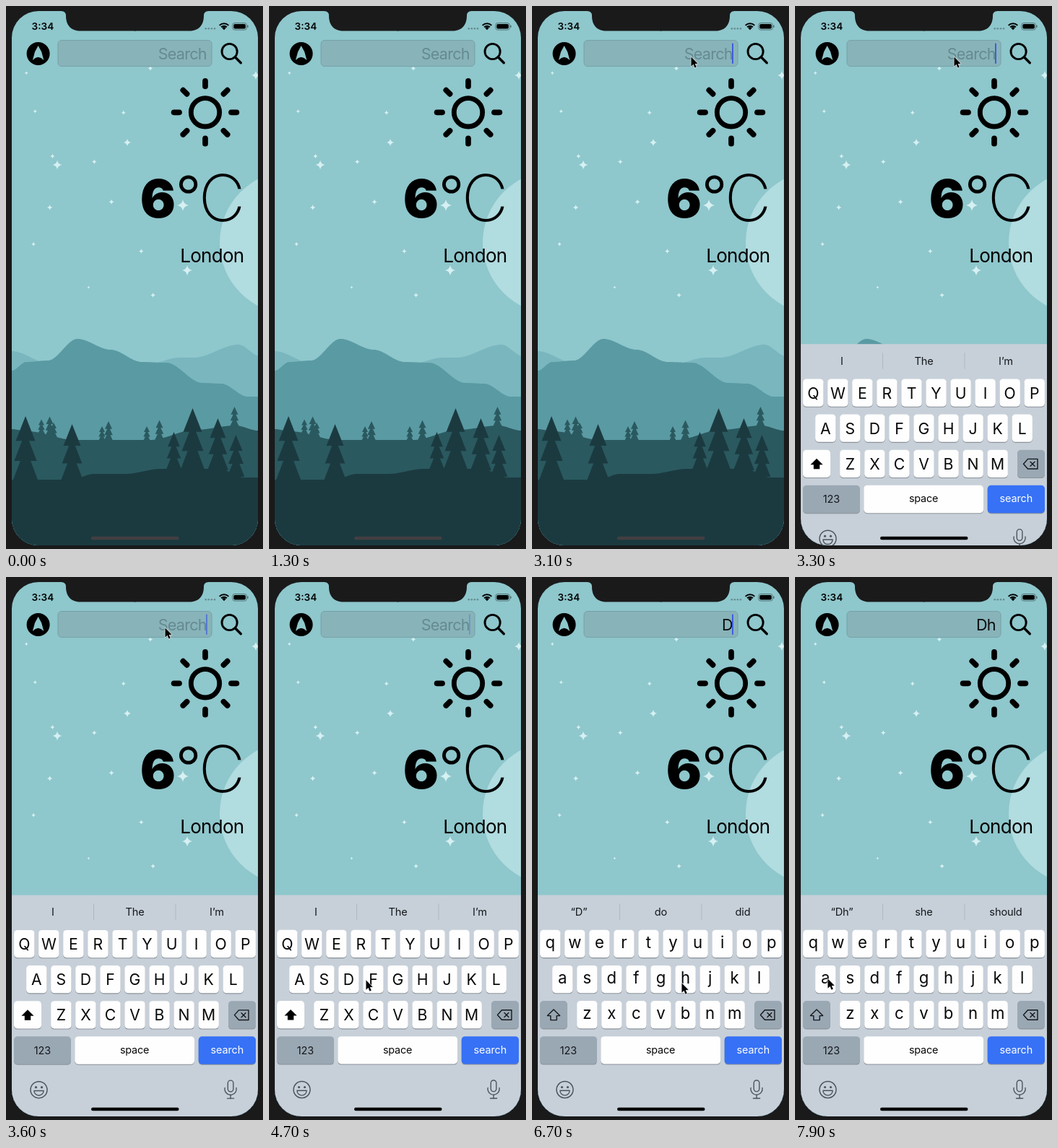
Animation, 356 px wide and 752 px high, one loop 8000 ms. Source, as an HTML page with a canvas:

```html
<!DOCTYPE html>
<html lang="en">
<head>
<meta charset="utf-8">
<title>Weather search</title>
<style>
html, body { margin: 0; width: 100%; height: 100%; overflow: hidden; background: #1a1a1b; }
canvas { display: block; width: 356px; height: 752px; }
</style>
</head>
<body>
<canvas id="stage"></canvas>
<script>
const W = 356, H = 752, LOOP = 8000, MID = 178.5;
const LEFT = 8, RIGHT = 349, TOP = 7;
const SKY = '#8ec7cc', BEZEL = '#1a1a1b', INK = '#15181b', GREY = '#9aa8b4';
const TAP = 3000, KEYS_UP = 3100, TYPE_D = 5400, TYPE_H = 7000;
const canvas = document.getElementById('stage');
const dpr = window.devicePixelRatio || 1;
canvas.width = W * dpr;
canvas.height = H * dpr;
const c = canvas.getContext('2d');

const clamp = v => Math.max(0, Math.min(1, v));
const smooth = p => p * p * (3 - 2 * p);
const mix = (a, b, p) => a + (b - a) * p;

function paint(fill) {
  c.fillStyle = fill;
  c.fill();
}

function stroke(width, color) {
  c.lineWidth = width;
  c.strokeStyle = color;
  c.stroke();
}

function text(str, x, y, size, { weight = 400, align = 'center', color = '#000', track = 0 } = {}) {
  c.font = `${weight} ${size}px Inter, "Open Sans", sans-serif`;
  c.letterSpacing = track + 'px';
  c.textAlign = align;
  c.fillStyle = color;
  c.fillText(str, x, y);
}

function round(x, y, w, h, r) {
  c.beginPath();
  c.roundRect(x, y, w, h, r);
}

function box(x, y, w, h, r, fill) {
  round(x, y, w, h, r);
  paint(fill);
}

function circle(x, y, r) {
  c.beginPath();
  c.arc(x, y, r, 0, Math.PI * 2);
}

function disc(x, y, r, fill) {
  circle(x, y, r);
  paint(fill);
}

function ring(x, y, r, width, color) {
  circle(x, y, r);
  stroke(width, color);
}

function line(x1, y1, x2, y2, width, color, cap = 'round') {
  c.beginPath();
  c.moveTo(x1, y1);
  c.lineTo(x2, y2);
  c.lineCap = cap;
  stroke(width, color);
}

// Polygon around (x, y); mirrored shapes list only their right half
function poly(x, y, pts, mirrored = false) {
  const all = mirrored ? [...pts, ...pts.map(([px, py]) => [-px, py]).reverse()] : pts;
  c.beginPath();
  all.forEach(([px, py]) => c.lineTo(x + px, y + py));
  c.closePath();
}

// Smooth height profile through a few points
const ridge = pts => x => {
  const i = pts.findIndex(p => p[0] > x);
  if (i < 0) return pts[pts.length - 1][1];
  if (i === 0) return pts[0][1];
  const [x0, y0] = pts[i - 1], [x1, y1] = pts[i];
  return mix(y0, y1, smooth((x - x0) / (x1 - x0)));
};

const LAYERS = [
  { color: '#79b6be', top: ridge([[8, 478], [60, 495], [200, 495], [240, 487], [260, 487], [322, 469], [352, 485]]) },
  { color: '#5a9aa3', top: ridge([[8, 505], [28, 493], [58, 491], [99, 461], [145, 476], [188, 493],
    [222, 494], [272, 522], [298, 523], [335, 541]]) },
  { color: '#2a595f', top: ridge([[8, 586], [30, 589], [95, 601], [200, 601], [262, 587], [318, 581], [349, 588]]),
    trees: [49, 60.5, 66, 142, 133, 212.5, 195, 316.5].map((x, i) => [x, i % 2 ? 26 : 19]) },
  { color: '#1b3a40', top: ridge([[90, 656], [122, 648], [165, 648], [215, 641], [295, 641], [330, 653]]),
    trees: [[27, 88], [91.5, 77], [232.5, 51], [258.5, 84], [293.5, 70], [318.5, 56]] }
];

function tree(x, base, h, fill) {
  const half = h * 0.18 + 1.5;
  for (let i = 0; i < 3; i++) {
    const apex = base - h * (1 - i * 0.24), foot = base - h * (2 - i) * 0.31;
    const w = half * (0.76 + i * 0.12);
    poly(x, 0, [[0, apex], [w, foot], [-w, foot]]);
    paint(fill);
  }
}

function layer({ color, top, trees = [] }) {
  c.beginPath();
  c.moveTo(LEFT, H);
  for (let x = LEFT; x <= RIGHT; x++) c.lineTo(x, top(x));
  c.lineTo(RIGHT, H);
  paint(color);
  trees.forEach(([x, h]) => tree(x, top(x) + 2, h + 2, color));
}

function star(x, y, r) {
  c.beginPath();
  c.moveTo(x + r, y);
  for (let i = 1; i <= 4; i++) {
    const a = i * Math.PI / 2, b = a - Math.PI / 4, k = r * 0.2;
    c.quadraticCurveTo(x + k * Math.cos(b), y + k * Math.sin(b), x + r * Math.cos(a), y + r * Math.sin(a));
  }
  paint('#d6f0f2');
}

function random(seed) {
  return () => (seed = seed * 16807 % 2147483647) / 2147483647;
}

function stars() {
  [[245, 276], [251, 366], [71, 220], [346, 96], [168, 189]].forEach(([x, y], i) => star(x, y, 8 - i * 0.7));
  // Small ones: one per cell of a loose 2 by 6 grid
  const rnd = random(4127);
  for (let i = 0; i < 12; i++) {
    star(mix(25, 125, rnd()) + (i % 2) * 90, 50 + Math.floor(i / 2) * 62 + rnd() * 50, mix(1.8, 4, rnd()));
  }
}

function landscape() {
  c.fillStyle = SKY;
  c.fillRect(0, 0, W, H);
  disc(395, 327.5, 99, '#b1dce0');
  stars();
  LAYERS.forEach(layer);
}

function statusBar() {
  text('3:34', 35.5, 33, 13.6, { weight: 600, align: 'left' });
  for (let i = 0; i < 4; i++) disc(276.7 + i * 4.1, 31.3, 1.3, '#648d91');
  for (let i = 0; i < 3; i++) {
    c.beginPath();
    c.arc(302, 33.2, 2 + i * 3.5, -Math.PI * 0.75, -Math.PI * 0.25);
    c.lineCap = 'butt';
    stroke(i ? 2 : 4, '#000');
  }
  round(313.8, 23.5, 19.6, 9.6, 3);
  stroke(0.9, '#4d6c70');
  box(315.3, 25, 16.6, 6.6, 1.8, '#000');
  box(334.3, 26.6, 1.3, 3.4, 0.7, '#4d6c70');
}

function caret(t) {
  if (t < TAP) return;
  const from = t >= TYPE_H ? TYPE_H : t >= TYPE_D ? TYPE_D : TAP;
  const p = (t - from) % 1000 / 1000;
  c.globalAlpha = clamp((0.8 - p) / 0.3) + clamp((p - 0.92) / 0.08);
  box(277, 51.5, 1.9, 28.5, 0.9, '#3a5be0');
  c.globalAlpha = 1;
}

function searchBar(t) {
  disc(44.6, 66, 16, '#000');
  poly(44.6, 66, [[0, -11], [4.6, -2.5], [7.7, 9], [4, 6], [0, 4.8]], true);
  paint(SKY);

  box(72, 47.5, 213, 36, 5, 'rgba(125,154,160,.44)');
  stroke(0.9, '#759fa5');
  const typed = t >= TYPE_H ? 'Dh' : t >= TYPE_D ? 'D' : '';
  text(typed || 'Search', 277.8, 74, 21.6, { align: 'right', track: -0.75, color: typed ? '#0b0d0e' : '#668a90' });
  caret(t);

  ring(309.6, 63, 10.6, 2.9, '#000');
  line(317.6, 71, 325.3, 78.7, 3.4, '#000');
}

function weather() {
  const x = 276, y = 147.3;
  ring(x, y, 19.7, 6.8, '#000');
  for (let i = 0; i < 8; i++) {
    const dx = Math.cos(i * Math.PI / 4), dy = Math.sin(i * Math.PI / 4);
    line(x + dx * 36, y + dy * 36, x + dx * 43.4, y + dy * 43.4, 7.7, '#000');
  }
  text('6', 210.5, 293, 73, { weight: 900 });
  ring(252.6, 247, 10.2, 4.8, '#000');
  text('C', 299, 298, 89, { weight: 250 });
  text('London', 329.5, 355, 26, { align: 'right', track: -0.7 });
}

function key(x, y, w, fill = '#fefefe') {
  box(x, y + 1, w, 38.4, 4.8, '#8b9299');
  box(x, y, w, 38.3, 4.8, fill);
}

function suggestions(t) {
  const words = t >= TYPE_H ? ['“Dh”', 'she', 'should']
    : t >= TYPE_D ? ['“D”', 'do', 'did'] : ['I', 'The', 'I’m'];
  words.forEach((w, i) => text(w, 65 + i * 113.5, 469, 14.6, { color: INK, track: -0.15 }));
  [121.5, 235].forEach(x => line(x, 452.5, x, 475, 0.9, '#adb5bd', 'butt'));
}

function letters(lower) {
  const pitch = 34.05;
  ['QWERTYUIOP', 'ASDFGHJKL', 'ZXCVBNM'].forEach((row, r) => {
    [...row].forEach((ch, i) => {
      const x = MID + (i - (row.length - 1) / 2) * pitch, y = 488.8 + r * 49.1;
      key(x - 14.2, y, 28.4);
      text(lower ? ch.toLowerCase() : ch, x, y + (lower ? 25.3 : 27.3), lower ? 22.2 : 21.2, { color: '#080808' });
    });
  });
}

function controls(lower) {
  c.lineJoin = 'round';
  key(11, 587, 38, lower ? GREY : '#fefefe');
  poly(30, 607, [[0, -8], [8.6, 0.6], [4.2, 0.6], [4.2, 6.6]], true);
  if (lower) stroke(1.4, INK);
  else paint('#000');

  key(308, 587, 38, GREY);
  poly(326.5, 606.5, [[-10, 0], [-4, -6.8], [9.5, -6.8], [9.5, 6.8], [-4, 6.8]]);
  stroke(1.4, INK);
  [-3, 3].forEach(d => line(329 - d, 603.5, 329 + d, 609.5, 1.4, INK));

  key(11, 636.2, 79, GREY);
  text('123', 50.5, 660.5, 14.4, { color: INK });
  key(95.3, 636.2, 165.8);
  text('space', 178, 659.5, 14.4, { color: '#080808', track: -0.2 });
  key(266.7, 636.2, 79.3, '#3671f6');
  text('search', 306.3, 659.5, 14.4, { color: '#fff', track: -0.1 });
}

function footer() {
  const ink = '#4d545c', x = 45.5, mic = 311.1;
  ring(x, 710, 11.5, 1.5, ink);
  [-4, 4].forEach(d => disc(x + d, 706.5, 1.6, ink));
  c.beginPath();
  c.arc(x, 711.3, 6.6, 0, Math.PI);
  c.closePath();
  stroke(1.4, ink);

  round(mic - 3.8, 697, 7.6, 15.6, 3.8);
  stroke(1.4, ink);
  c.beginPath();
  c.arc(mic, 709, 8.1, -0.2, Math.PI + 0.2);
  stroke(1.4, ink);
  line(mic, 717.2, mic, 722, 1.4, ink);
  line(mic - 4.6, 722, mic + 4.6, 722, 1.4, ink);
}

function keyboard(t) {
  // Critically damped spring
  const s = (t - KEYS_UP) / 50;
  c.save();
  c.translate(0, 307 * (1 + s) * Math.exp(-s));
  c.fillStyle = '#c7d0d9';
  c.fillRect(0, 440.5, W, 320);
  suggestions(t);
  letters(t >= TYPE_D);
  controls(t >= TYPE_D);
  footer();
  c.restore();
}

// Each stop: arrival time and place; every move takes the same time
const MOVE = 600;
const STOPS = [[0, 262, 760], [2700, 220, 70], [4700, 134, 558], [5300, 113, 560], [6400, 207, 562], [7800, 45, 556]];

function pointer(t) {
  let [, x, y] = STOPS[0];
  STOPS.slice(1).forEach(([at, sx, sy]) => {
    const p = smooth(clamp((t - at + MOVE) / MOVE));
    x = mix(x, sx, p);
    y = mix(y, sy, p);
  });
  poly(x, y, [[0.5, 0.5], [0.5, 13.5], [3.5, 10.8], [5.5, 15.6], [7.7, 14.6], [5.7, 10], [9.6, 9.8]]);
  c.lineJoin = 'round';
  stroke(1.5, '#e4eaec');
  paint('#000');
}

function notch() {
  [-1, 1].forEach(side => {
    const x = d => MID + side * d;
    c.beginPath();
    c.moveTo(MID, 0);
    c.lineTo(x(102), 0);
    c.lineTo(x(102), TOP);
    c.quadraticCurveTo(x(95.5), TOP, x(95.5), TOP + 6.5);
    c.bezierCurveTo(x(95.5), 28, x(87), 34.5, x(75.5), 34.5);
    c.lineTo(MID - side, 34.5);
    c.lineTo(MID - side, 0);
    paint(BEZEL);
  });
}

function draw(t) {
  c.setTransform(dpr, 0, 0, dpr, 0, 0);
  c.fillStyle = BEZEL;
  c.fillRect(0, 0, W, H);
  c.save();
  round(LEFT, TOP, RIGHT - LEFT, 740, 37);
  c.clip();
  landscape();
  statusBar();
  searchBar(t);
  weather();
  if (t > KEYS_UP) keyboard(t);
  box(118, 734.8, 121.5, 4.4, 2.2, t > KEYS_UP + 50 ? '#050505' : '#433f42');
  c.restore();
  notch();
  pointer(t);
}

const start = performance.now();
function tick() {
  draw((performance.now() - start) % LOOP);
  requestAnimationFrame(tick);
}
tick();
</script>
</body>
</html>
```
